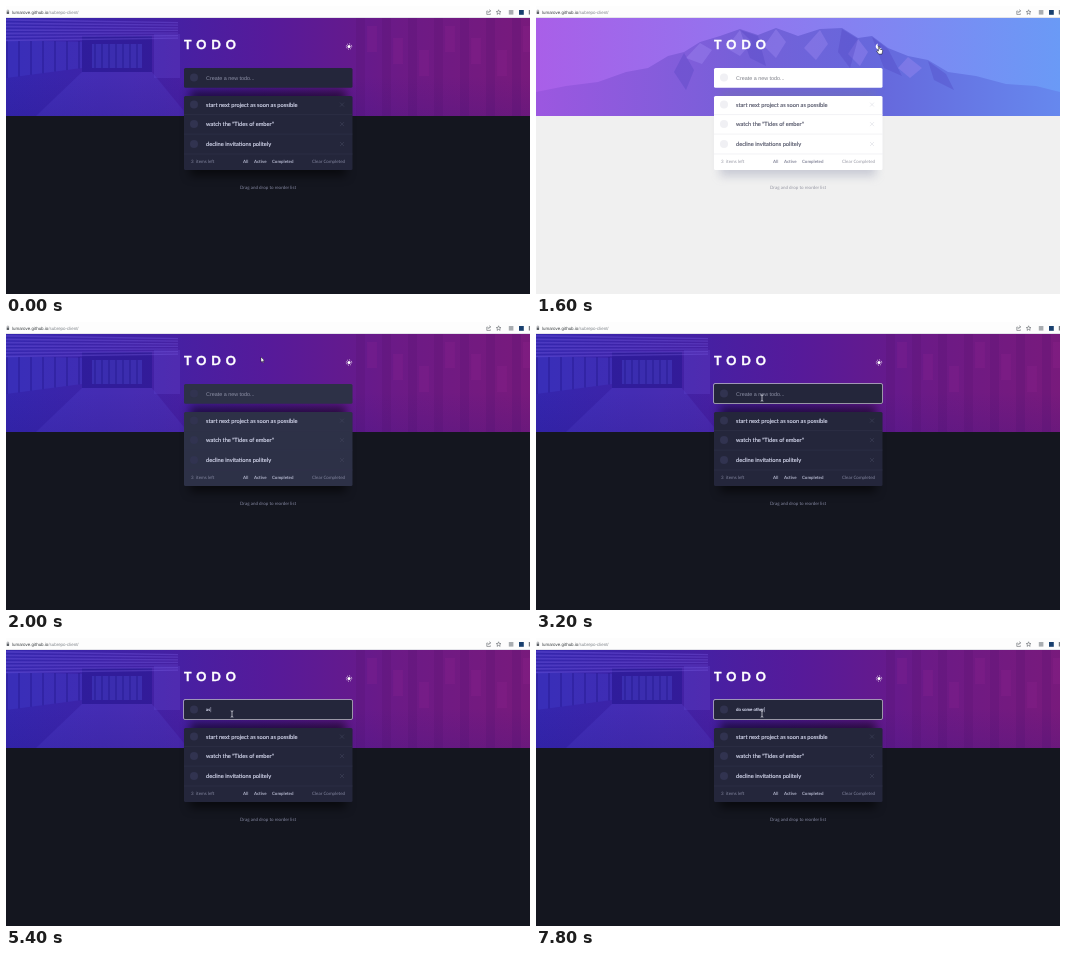
Write an HTML page that moves like this. It is 524x288 px and loops after 8 s.

```html
<!DOCTYPE html>
<html lang="en">
<head>
<meta charset="utf-8">
<title>Todo</title>
<style>
  html, body { margin: 0; width: 100%; height: 100%; overflow: hidden; background: #14161f; }
  svg { display: block; width: 100vw; height: 100vh; font-family: Lato, sans-serif; text-rendering: geometricPrecision;
    --page: #14161f; --card: #24263b; --text: #d5d8ee; --muted: #83869f; --filter: #b3b6cd;
    --line: #30324a; --ring: #313350; --cross: #41445c; --hint: #8d90a6; --shade: rgba(0,0,0,.55); }
  svg.light { --page: #f0f0f0; --card: #fff; --text: #55576a; --muted: #9899a5; --filter: #85879a;
    --line: #e9e9ee; --ring: #f0f0f4; --cross: #dcdde4; --hint: #7f8189; --shade: rgba(120,125,155,.32); }
  svg.settling { --card: #2d3147; }
  svg.light .night, svg:not(.light) .day { display: none; }
  .page { fill: var(--page); }
  .card { fill: var(--card); }
  .shadow { fill: var(--shade); filter: blur(5px); }
  .item { fill: var(--text); stroke: var(--text); stroke-width: .15; font-size: 5.7px; }
  .small { fill: var(--muted); font-size: 4.5px; }
  .filter { fill: var(--filter); font-size: 4.4px; font-weight: 700; }
  .ring { fill: var(--ring); }
  .cross { stroke: var(--cross); stroke-width: .6; }
  .line { stroke: var(--line); stroke-width: .6; }
  .hint { fill: var(--hint); font: 5.4px "Liberation Sans", Arial, sans-serif; }
  .url { font: 4.45px "Liberation Sans", Arial, sans-serif; }
</style>
</head>
<body>
<svg id="stage" viewBox="0 0 524 288" preserveAspectRatio="none">
  <defs>
    <linearGradient id="dusk">
      <stop offset="0" stop-color="#3426ae"/><stop offset=".3" stop-color="#4421a4"/>
      <stop offset=".5" stop-color="#561a9a"/><stop offset=".75" stop-color="#6c1a86"/>
      <stop offset="1" stop-color="#781a7c"/>
    </linearGradient>
    <linearGradient id="dawn">
      <stop offset="0" stop-color="#a95fe8"/><stop offset=".45" stop-color="#8f78ef"/>
      <stop offset="1" stop-color="#6a9af6"/>
    </linearGradient>
    <linearGradient id="rock">
      <stop offset="0" stop-color="#9c57e0"/><stop offset=".4" stop-color="#7560d8"/>
      <stop offset=".65" stop-color="#6668dc"/><stop offset="1" stop-color="#6688ee"/>
    </linearGradient>
    <linearGradient id="fade" x2="0" y2="1">
      <stop offset="0" stop-color="#20107a" stop-opacity="0"/><stop offset="1" stop-color="#20107a" stop-opacity=".15"/>
    </linearGradient>
    <clipPath id="banner"><path d="M0 12H524V110H0Z"/></clipPath>
  </defs>

  <path class="page" d="M0 0H524V288H0Z"/>

  <g clip-path="url(#banner)">
    <g class="night">
      <path fill="url(#dusk)" d="M0 12H524V110H0Z"/>
      <g id="hall"></g>
      <path fill="url(#fade)" d="M0 70H524V110H0Z"/>
    </g>
    <g class="day">
      <path fill="url(#dawn)" d="M0 12H524V110H0Z"/>
      <path fill="url(#rock)" d="M0 86L30 80 62 76 90 66 112 62 132 50 148 46 164 36 184 30 204 23 222 29 240 22 262 30 284 23 306 22 322 32 336 30 352 42 372 50 392 54 412 66 440 70 470 78 500 80 524 86V110H0Z"/>
      <path fill="#a48cf2" opacity=".35" d="M164 37L176 44 166 58 150 52ZM204 24L216 36 204 50 190 42ZM240 23L250 36 240 52 228 40ZM284 24L292 38 280 54 268 42ZM322 33L332 46 324 60 312 48ZM372 51L386 62 374 72 362 62Z"/>
      <path fill="#4e40bc" opacity=".3" d="M204 24L222 30 230 60 214 52ZM306 23L322 33 314 62 302 46ZM336 31L352 43 366 70 348 62ZM148 47L158 64 150 84 138 66ZM392 55L410 68 418 84 398 74Z"/>
    </g>
  </g>

  <path fill="#fdfdfd" d="M0 0H524V11H0Z"/>
  <path fill="#e4e4ea" d="M0 11H524V12H0Z"/>
  <path fill="#5f6368" d="M.7 5.5H3.1V8H.7Z"/>
  <path fill="none" stroke="#5f6368" stroke-width=".5" d="M1.2 5.6V4.6a.7.7 0 0 1 1.4 0V5.6"/>
  <text class="url" x="6" y="8" fill="#3c4043">lumarove.github.io<tspan fill="#80868b">/subrepo-client/</tspan></text>
  <g fill="none" stroke="#5f6368" stroke-width=".6">
    <path d="M481.8 5H480.8V8.4H484.4V7.5M482 7Q482.3 5 484.5 4.9M483.4 3.7L484.7 4.9 483.4 6.1"/>
    <path d="M492.6 3.8L493.3 5.5 495 5.6 493.7 6.7 494.1 8.4 492.6 7.4 491.1 8.4 491.5 6.7 490.2 5.6 491.9 5.5Z"/>
  </g>
  <path fill="#a9adb1" d="M502.8 4H507.4V8.6H502.8Z"/>
  <path fill="#183f6e" d="M513 4H517.8V8.8H513Z"/>
  <path fill="#777b80" d="M522.8 4H524V8.6H522.8Z"/>

  <text x="178" y="43.2" fill="#fff" stroke="#fff" stroke-width=".4" font-size="12.5" font-weight="700" letter-spacing="5">TODO</text>
  <g class="night" fill="#fff" stroke="#fff">
    <circle cx="343" cy="40.5" r="1.5" stroke="none"/>
    <circle cx="343" cy="40.5" r="2.7" fill="none" stroke-width=".9" stroke-dasharray=".8 1.3206"/>
  </g>
  <path class="day" fill="#fff" d="M342 37.4A3.2 3.2 0 1 0 345.8 41.8 3 3 0 0 1 342 37.4Z"/>

  <rect class="shadow" x="184" y="84" width="156" height="86"/>
  <rect class="card" x="178" y="62" width="168.5" height="19.7" rx="1.5"/>
  <circle class="ring" cx="188" cy="71.4" r="4"/>
  <rect id="focus" x="177.5" y="61.5" width="169" height="20" rx="1.5" fill="none" stroke="#b4b5be" stroke-width=".8"/>
  <text id="hint" class="hint" x="200" y="73.5">Create a new todo...</text>
  <text id="typed" class="item" x="200" y="73" style="font-size:4.4px"></text>
  <path id="caret" stroke="#b9bbd0" stroke-width=".5" d="M0 69V74.2"/>

  <rect class="card" x="178" y="90" width="168.5" height="74" rx="1.5"/>
  <g id="list"></g>
  <text class="small" x="185" y="156.5">3</text>
  <text class="small" x="190" y="156.5">items left</text>
  <text class="filter" x="237" y="157.3">All</text>
  <text class="filter" x="248" y="157.3">Active</text>
  <text class="filter" x="266" y="157.3">Completed</text>
  <text class="small" x="306" y="156.5">Clear Completed</text>
  <text class="small" x="262" y="182.6" text-anchor="middle">Drag and drop to reorder list</text>

  <g id="pointer" stroke-linejoin="round">
    <path id="arrow" fill="#fff" stroke="#111" stroke-width=".4" d="M0 0V5.2L1.2 4.1 2 5.8 2.8 5.4 2 3.8H3.6Z"/>
    <path id="hand" fill="#fff" stroke="#111" stroke-width=".5" d="M-.6 0Q0-.7.6 0V2.6L3.2 3.2Q3.8 3.5 3.6 4.6L3 7.6H-.3L-2.4 4.6Q-2.2 3.6-.6 4.6Z"/>
    <path id="beam" fill="none" stroke="#e4e5ee" stroke-width=".7" d="M-1.3-3.2Q0-3.2 0-2.4 0-3.2 1.3-3.2M0-2.6V2.6M-1.3 3.2Q0 3.2 0 2.4 0 3.2 1.3 3.2"/>
  </g>
</svg>
<script>
const LOOP = 8000, STEP = 200;
const $ = id => document.getElementById(id);
const stage = $('stage');

$('list').innerHTML = [
  ['start next project as soon as possible', 98.6],
  ['watch the "Tides of ember"', 118.1],
  ['decline invitations politely', 138]
].map(([label, y]) => `
  <circle class="ring" cx="188" cy="${y}" r="4"/>
  <text class="item" x="200" y="${y + 1.9}">${label}</text>
  <path class="cross" d="M334 ${y - 2}l4 4m0-4l-4 4"/>
  <path class="line" d="M178 ${y + 10}H346.5"/>`).join('');

// Hall: slatted ceiling, side panels, a far doorway, lit floor and wall blocks.
const poly = (d, fill, opacity) => `<path d="${d}" fill="${fill}" opacity="${opacity}"/>`;
let hall = poly('M0 34L76 36V62L0 72Z', '#4a50e0', .2)
  + poly('M76 30H146V66H76Z', '#20168a', .45)
  + poly('M86 38H136V62H86Z', '#4e4ed8', .35)
  + poly('M148 28H174V72H148Z', '#6a4cd8', .25)
  + poly('M76 66H146L182 110H30Z', '#5a50dc', .22);
for (let i = 0; i < 7; i++) {
  hall += poly(`M0 ${13 + i * 3.4}L172 ${16 + i * 2.6}v1.2L0 ${14.8 + i * 3.4}Z`, '#8068ec', .3);
  hall += poly(`M${i * 12} 35h2V${72 - i * 1.6}h-2Z`, '#24168c', .4);
  hall += poly(`M${88 + i * 7} 38h2V62h-2Z`, '#24168c', .4);
  hall += poly(`M${350 + i * 26} 12h9V110h-9Z`, '#511270', .22);
  hall += poly(`M${361 + i * 26} ${20 + i % 3 * 12}h10v26h-10Z`, '#9a2a98', .16);
}
$('hall').innerHTML = hall;

const pointerPath = [
  [600, 'arrow', 396, 94], [800, 'arrow', 372, 68], [1000, 'arrow', 352, 48],
  [1200, 'hand', 343, 40.5], [2000, 'arrow', 255, 35], [2200, 'arrow', 236, 54],
  [2400, 'beam', 226, 76]
];
const typing = [
  [0, ''], [5000, 'a'], [5200, 'as'], [5800, 'a'], [6000, ''], [6200, 'd'], [6400, 'do'],
  [6600, 'do s'], [6800, 'do so'], [7000, 'do some'], [7200, 'do some o'],
  [7400, 'do some ot'], [7600, 'do some othe'], [7800, 'do some other']
];
const latest = (table, t) => table.filter(row => row[0] <= t).pop();
const show = (id, on) => { $(id).style.display = on ? '' : 'none'; };

function draw(t) {
  stage.classList.toggle('light', t >= 1600 && t < 2000);
  stage.classList.toggle('settling', t >= 2000 && t < 2200);

  const [, kind, x, y] = latest(pointerPath, t) || [0, '', 0, 0];
  for (const id of ['arrow', 'hand', 'beam']) show(id, id === kind);
  $('pointer').setAttribute('transform', `translate(${x} ${y})`);

  const text = latest(typing, t)[1];
  const focused = t >= 2600;
  $('typed').textContent = text;
  show('hint', !text);
  show('focus', focused);
  show('caret', focused && (text || (t - 2400) % 1000 < 500));
  const end = text ? $('typed').getComputedTextLength() + .3 : 0;
  $('caret').setAttribute('transform', `translate(${200.3 + end} 0)`);
}

let shown = -1;
function tick() {
  const t = Math.floor(performance.now() % LOOP / STEP) * STEP;
  if (t !== shown) draw(shown = t);
  requestAnimationFrame(tick);
}
tick();
</script>
</body>
</html>
```
